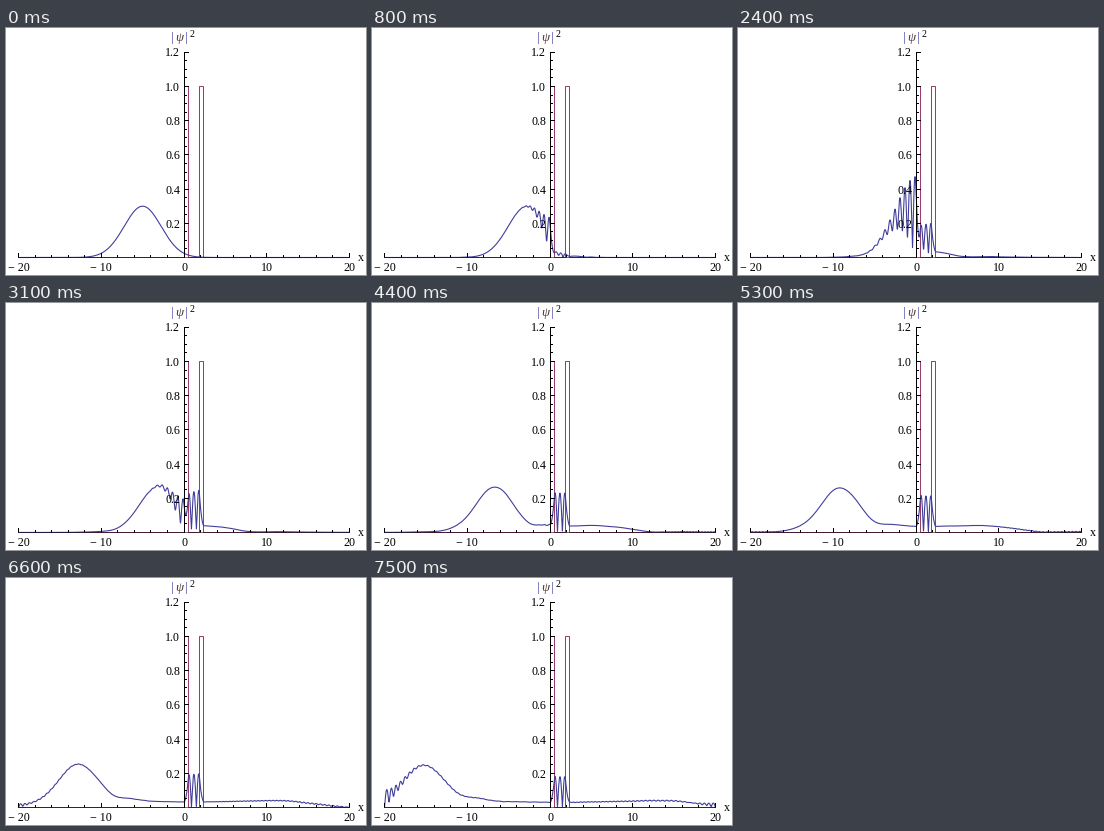
A matplotlib script that plays this animation: 360x247 px, repeating every 7600 ms.

```python
import numpy as np
import matplotlib.pyplot as plt
from matplotlib.animation import FuncAnimation

W, H, DPI = 360, 247, 100
FRAMES, INTERVAL = 76, 100
BLUE, PURPLE = "#3f3d99", "#993d71"
PX = 72 / DPI  # one pixel in points

# Wave packet meeting a double barrier inside a box (hbar = m = 1)
LENGTH, MODES = 40.0, 500
HEIGHT = 20.0
BARRIERS = [(0.0, 0.5), (1.9, 2.4)]
START, SPREAD, K0, PEAK = -5.0, 5.0, 5.22, 0.3
DT = 0.0524


def cos_integral(q, a, b):
    """Integral of cos(q u) for u from a to b."""
    return (b - a) * np.cos(q * (a + b) / 2) * np.sinc(q * (b - a) / (2 * np.pi))


def solve():
    """Amplitude on a grid, one column per time step."""
    x = np.linspace(-LENGTH / 2, LENGTH / 2, 2001)
    u = x + LENGTH / 2
    k = np.arange(1, MODES + 1) * np.pi / LENGTH
    basis = np.sin(np.outer(u, k))

    ham = np.diag(k**2 / 2)
    diff, total = k[:, None] - k, k[:, None] + k
    for a, b in BARRIERS:
        a, b = a + LENGTH / 2, b + LENGTH / 2
        ham += HEIGHT / LENGTH * (cos_integral(diff, a, b) - cos_integral(total, a, b))

    psi0 = PEAK * np.exp(-(x - START) ** 2 / (2 * SPREAD) + 1j * K0 * x)
    c0 = 2 / LENGTH * (x[1] - x[0]) * (basis.T @ psi0)
    energy, states = np.linalg.eigh(ham)
    times = DT * np.arange(FRAMES)
    phases = np.exp(-1j * np.outer(energy, times))
    coeffs = states @ (phases * (states.T @ c0)[:, None])
    return x, np.abs(basis @ coeffs)


def sx(x):
    return 178 + 8.275 * np.asarray(x)


def sy(y):
    return 229.5 - 171 * np.asarray(y)


def crisp(v):
    """Centre of the pixel that holds v."""
    return np.floor(v) + 0.5


fig = plt.figure(figsize=(W / DPI, H / DPI), dpi=DPI, facecolor="white")
ax = fig.add_axes([0, 0, 1, 1])
ax.set(xlim=(0, W), ylim=(H, 0))
ax.axis("off")


def stroke(xs, ys, color="black", width=1.0, **kw):
    return ax.plot(xs, ys, color=color, lw=width * PX, snap=False,
                   solid_capstyle="butt", solid_joinstyle="miter", **kw)[0]


def label(x, y, s, size=12, ha="center", **kw):
    ax.text(x, y, s, fontsize=size * PX, family="Liberation Serif",
            ha=ha, va="baseline", zorder=6, **kw)


def draw_axes():
    stroke([12, 344], [229.5, 229.5], alpha=0.55, zorder=4)
    stroke([178.5, 178.5], [24, 230], zorder=4)
    for v in range(-20, 21, 2):
        major = v % 10 == 0
        px = crisp(sx(v))
        stroke([px, px], [229.5, 225 if major else 227], zorder=4)
        if major:
            label(sx(v), 243, f"\u2212 {-v}" if v < 0 else str(v))
    for i in range(1, 25):
        v = i * 0.05
        major = i % 4 == 0
        py = crisp(sy(v) + 1e-6)
        stroke([178.5, 183 if major else 181], [py, py], zorder=4)
        if major:
            label(174, py + 4, f"{v:.1f}", ha="right")
    label(354.5, 233, "x")
    label(166.8, 13, "|", size=13, color=BLUE)
    label(173.7, 13, "\u03c8", size=13, style="italic", color="#4a3430")
    label(180.3, 13, "|", size=13, color=BLUE)
    label(185.5, 9, "2", size=10)


def draw_barriers():
    xs, ys = [-20], [0]
    for a, b in BARRIERS:
        xs += [a, a, b, b]
        ys += [0, 1, 1, 0]
    stroke(crisp(sx(xs + [20])), sy(ys + [0]), PURPLE, zorder=3)


draw_axes()
draw_barriers()
grid, amplitude = solve()
wave = stroke(sx(grid), sy(amplitude[:, 0]), BLUE, width=1.1, zorder=3.5)
wave.set_solid_joinstyle("round")


def update(i):
    wave.set_ydata(sy(amplitude[:, i]))
    return (wave,)


anim = FuncAnimation(fig, update, frames=FRAMES, interval=INTERVAL,
                     repeat=True, repeat_delay=0, blit=False)
plt.show()
```
